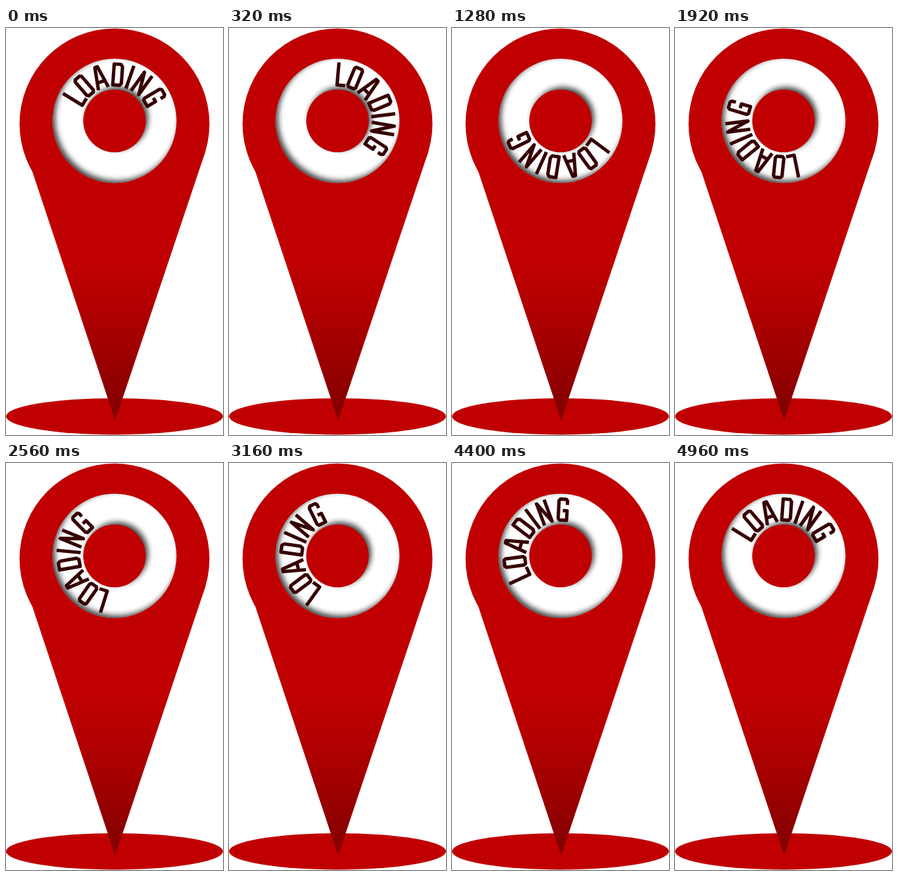
An HTML page for the animation above (5 s loop, 332 by 620 pixels).

```html
<!DOCTYPE html>
<html lang="en">
<head>
<meta charset="utf-8">
<title>Loading</title>
<style>
  html, body { margin: 0; width: 100%; height: 100%; overflow: hidden; background: #fff; }
  svg { display: block; }
</style>
</head>
<body>
<svg width="332" height="620" viewBox="0 0 332 620" role="img" aria-label="LOADING">
  <defs>
    <linearGradient id="shade" gradientUnits="userSpaceOnUse" x1="0" y1="355" x2="0" y2="598">
      <stop offset="0" stop-color="#c00000"/>
      <stop offset=".3" stop-color="#b20000"/>
      <stop offset=".85" stop-color="#8b0000"/>
      <stop offset="1" stop-color="#800000"/>
    </linearGradient>
    <filter id="blur" x="-20%" y="-20%" width="140%" height="140%">
      <feGaussianBlur stdDeviation="4"/>
    </filter>
    <clipPath id="ring"><circle cx="166" cy="141.5" r="94.8"/></clipPath>
  </defs>

  <ellipse cx="166" cy="591.7" rx="166" ry="27.7" fill="#c00000"/>
  <circle cx="166" cy="146" r="145.3" fill="#c00000"/>
  <path d="M167 598L29.7 187L305.5 187Z" fill="url(#shade)"/>

  <g clip-path="url(#ring)">
    <circle cx="166" cy="141.5" r="96" fill="#fff"/>
    <g filter="url(#blur)" opacity=".75" transform="translate(170 137.5)">
      <circle r="115" fill="none" stroke="#000" stroke-width="40"/>
      <circle r="47.5"/>
    </g>
  </g>
  <circle cx="166" cy="141.5" r="47.8" fill="#c00000"/>

  <g id="word" fill="none" stroke="#360003" stroke-width="5.2" stroke-linejoin="round"></g>
</svg>

<script>
// Squared condensed capitals: angle on the ring, then strokes above the baseline.
const letters = [
  [-58.5, "M-5.5 -37V-2.5H7"],
  [-41, "M-4.5 -34.5H4.5L6.5 -32V-5L4.5 -2.5H-4.5L-6.5 -5V-32Z"],
  [-19, "M-8 0L-2 -34.5H2L8 0M-6 -11H6"],
  [4, "M-6.5 -34.5H4L6.5 -31V-6L4 -2.5H-6.5Z"],
  [19.5, "M0 -37V0"],
  [36, "M-6.5 0V-35L6.5 -2V-37"],
  [59.5, "M6.5 -26V-32L4.5 -34.5H-4.5L-6.5 -32V-5L-4.5 -2.5H6.5V-17H0"]
];
const word = document.getElementById("word");
word.innerHTML = letters.map(([angle, d]) =>
  `<path transform="rotate(${angle}) translate(0 -52)" d="${d}"/>`).join("");

// Time in ms and turn in degrees: fast start, slow drift, fast finish.
const keys = [[0, 0], [600, 110.5], [1280, 185], [1920, 227], [2560, 256],
              [3360, 279], [3920, 290], [4480, 308.5], [4960, 360]];
const slope = (a, b) => (b[1] - a[1]) / (b[0] - a[0]);
const speeds = keys.map((key, i) => {
  if (i === 0) return 0.21;
  if (i === keys.length - 1) return 0.175;
  const prev = keys[i - 1], next = keys[i + 1];
  const before = slope(prev, key), after = slope(key, next);
  return (before * (next[0] - key[0]) + after * (key[0] - prev[0])) / (next[0] - prev[0]);
});

function turnAt(t) {
  const i = Math.max(1, keys.findIndex(key => key[0] >= t)) - 1;
  const [t0, a0] = keys[i], [t1, a1] = keys[i + 1];
  const span = t1 - t0, u = (t - t0) / span, v = 1 - u;
  return a0 * v * v * (1 + 2 * u) + a1 * u * u * (3 - 2 * u)
       + span * u * v * (speeds[i] * v - speeds[i + 1] * u);
}

function draw(now) {
  const t = Math.floor(now % 5000 / 40) * 40;
  word.setAttribute("transform", `translate(166 141.5) rotate(${turnAt(t)})`);
  requestAnimationFrame(() => draw(performance.now()));
}
draw(0);
</script>
</body>
</html>
```
